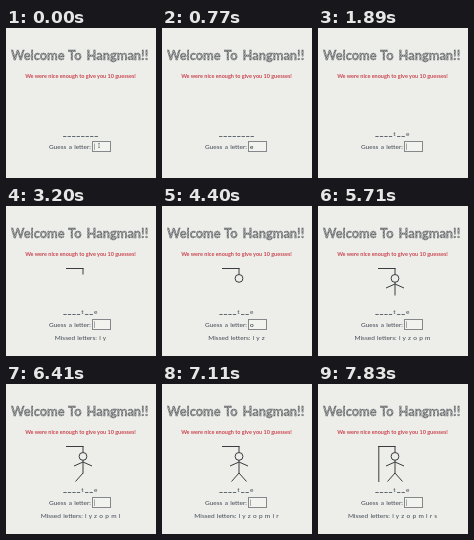
An HTML page that plays this animation: 150x150 px, repeating every 8000 ms.

```html
<!DOCTYPE html>
<html lang="en">
<head>
<meta charset="utf-8">
<title>Hangman</title>
<style>
  html, body { margin: 0; width: 100%; height: 100%; overflow: hidden; background: #edeeea; }
  svg { display: block; width: 100vw; height: 100vh; }
  text { font-family: Lato, "Open Sans", sans-serif; }
  .title { font-size: 12.8px; font-weight: 700; fill: url(#hatch); stroke: #606366; stroke-width: .3; }
  .hint { font-size: 5.5px; font-weight: 700; fill: #cb4650; }
  .label { font-size: 6.5px; fill: #404853; word-spacing: .6px; }
  .mid { text-anchor: middle; }
  .ink { fill: none; stroke: #3a3d40; stroke-width: 1; }
</style>
</head>
<body>
<svg viewBox="0 0 150 150">
  <defs>
    <pattern id="hatch" width="1.8" height="1.8" patternUnits="userSpaceOnUse" patternTransform="rotate(35)">
      <rect width="1.8" height="1.8" fill="#b4b6b5"/>
      <rect width=".9" height="1.8" fill="#5e6164"/>
    </pattern>
  </defs>
  <rect width="150" height="150" fill="#edeeea"/>
  <g class="title">
    <text x="5" y="32">Welcome</text>
    <text x="62" y="32">To</text>
    <text x="80.5" y="32">Hangman!!</text>
  </g>
  <text class="hint mid" x="74.5" y="50">We were nice enough to give you 10 guesses!</text>
  <g class="ink" id="drawing">
    <path d="M60 62.5H77.5"/>
    <path d="M77 62V68.5"/>
    <circle cx="77" cy="72.4" r="3.9"/>
    <path d="M77 76V89.5"/>
    <path d="M77 78L68 82"/>
    <path d="M77 78L86 82"/>
    <path d="M77 89L69.5 97.5"/>
    <path d="M77 89L84.5 97.5"/>
    <path d="M60.8 62V98"/>
  </g>
  <g class="label" id="word"></g>
  <text class="label" x="43" y="121">Guess a letter:</text>
  <rect x="86.5" y="113.5" width="18" height="10" fill="#f2f3ef" stroke="#85888a" stroke-width="1"/>
  <path id="pointer" d="M92 115.5h2M93 115.5v4M92 119.5h2" fill="none" stroke="#6b6f73" stroke-width=".6"/>
  <path id="caret" d="M88.5 115.5v6.5" stroke="#85888a" stroke-width=".7"/>
  <text class="label" id="entry" x="88" y="121.3" style="fill:#25282b"></text>
  <text class="label mid" id="missed" x="74.5" y="133.6"></text>
</svg>
<script>
const LOOP = 8000;
const ANSWER = "????t??e";
// letter, time typed, time submitted
const GUESSES = [
  ["e", 770, 1330], ["t", 1330, 1890], ["l", 2500, 2630],
  ["y", 3080, 3200], ["z", 3670, 3810], ["o", 4400, 4530],
  ["p", 4960, 5110], ["m", 5570, 5710], ["l", 6270, 6410],
  ["r", 6980, 7110], ["s", 7700, 7830]
];
const WIDTHS = { _: 3.3, e: 3.6, t: 2.5 };
const GAP = 1.2;
const byId = id => document.getElementById(id);
const show = (el, visible) => el.style.display = visible ? "" : "none";
const parts = [...byId("drawing").children];

function wordMarkup(found) {
  const chars = [...ANSWER].map(c => found.includes(c) ? c : "_");
  const total = chars.reduce((sum, c) => sum + WIDTHS[c] + GAP, -GAP);
  let x = 74.5 - total / 2;
  return chars.map(c => {
    const mark = c === "_"
      ? `<rect x="${x}" y="108" width="${WIDTHS._}" height=".8"/>`
      : `<text x="${x}" y="108.4">${c}</text>`;
    x += WIDTHS[c] + GAP;
    return mark;
  }).join("");
}

let shown = "";
function render(time) {
  const done = GUESSES.filter(g => time >= g[2]).map(g => g[0]);
  const typing = GUESSES.find(g => time >= g[1] && time < g[2]);
  const found = done.filter(c => ANSWER.includes(c));
  const missed = done.filter(c => !ANSWER.includes(c));
  show(byId("pointer"), time < 460);
  show(byId("caret"), !typing);
  byId("entry").textContent = typing ? typing[0] : "";
  byId("missed").textContent = missed.length ? "Missed letters: " + missed.join(" ") : "";
  parts.forEach((part, i) => show(part, i < missed.length));
  const markup = wordMarkup(found);
  if (markup !== shown) byId("word").innerHTML = shown = markup;
}

const start = performance.now();
function tick() {
  render((performance.now() - start) % LOOP);
  requestAnimationFrame(tick);
}
tick();
</script>
</body>
</html>
```
